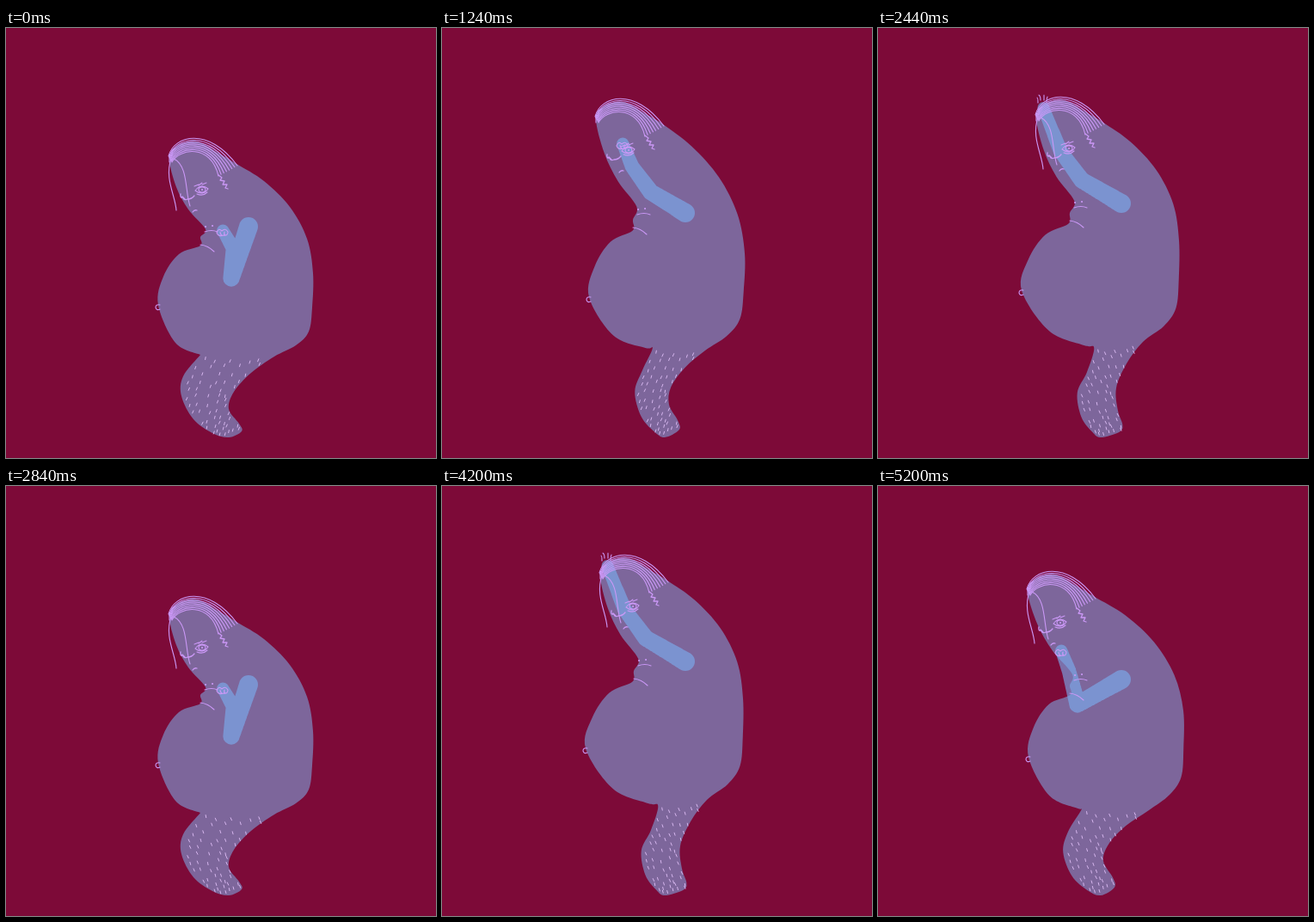
Write an HTML page with a canvas that moves like this. It is 500 px wide and 500 px high and loops after 5.28 s.

```html
<!DOCTYPE html>
<html>
<head>
<meta charset="utf-8">
<style>
html, body { margin: 0; height: 100%; overflow: hidden; background: #7d0a38; }
canvas { display: block; }
</style>
</head>
<body>
<canvas id="stage" width="500" height="500"></canvas>
<script>
const ctx = document.getElementById('stage').getContext('2d');
const BODY = 'rgb(125,102,155)', ARM = 'rgba(123,174,240,.62)';
const LINE = '#cb98f6', FUZZ = '#d6b6ee';

// Crouching outline, clockwise from the crown. A repeated point makes a corner.
const outline = [
  [190,152], [199,137], [222,132], [248,146], [268,158], [300,178], [330,208], [350,245], [357,285],
  [356,325], [352,353], [337,369], [312,382], [285,401], [265,423], [259,443], [271,460], [274,469],
  [259,476], [240,471], [218,455], [204,428], [206,405], [226,380], [226,380], [197,366], [177,322],
  [183,289], [201,263], [226,253], [226,243], [232,234], [212,211], [198,185]];

// Outline points that follow a joint; the points between blend their neighbours.
const handles = [[0, 'head'], [4, 'head'], [8, 'back'], [12, 'hip'], [15, 'shin'], [18, 'foot'],
  [22, 'knee'], [26, 'belly'], [30, 'neck'], [34, 'head']];

// Joints move relative to the crouch; arms run from shoulder to hand.
const zero = [0, 0];
const low = {
  head: zero, back: zero, hip: zero, shin: zero, foot: zero, knee: zero, belly: zero, neck: zero,
  arm: [282,231, 262,291, 264,256, 252,235]
};
const squat = { ...low, head: [-8,1], back: [1,0], hip: [-8,9], shin: [-8,-5], knee: [-2,2],
  belly: [6,6], neck: [-3,6], arm: [280,243, 265,299, 264,266, 251,245] };
const rise = { ...low, head: [-11,-46], back: [-5,-23], hip: [-6,-7], shin: [5,-5], knee: [27,-7],
  belly: [-6,-9], neck: [-4,-20], arm: [283,215, 243,191, 221,161, 210,134] };
const reach = { ...low, head: [-6,-48], back: [-7,-38], hip: [-4,-17], shin: [20,2], knee: [37,-5],
  belly: [-10,-17], neck: [-3,-28], arm: [283,204, 237,177, 212,143, 192,92] };
const sink = { ...low, head: [-16,-29], back: [-2,-24], hip: [3,-5], shin: [3,-7], knee: [15,-3],
  belly: [-2,-7], neck: [-3,-11], arm: [283,225, 232,254, 222,215, 213,191] };

const lerp = (a, b, k) => a + (b - a) * k;
const lerpAll = (a, b, k) => a.map((v, i) => lerp(v, b[i], k));
const mix = (a, b, k) => Object.fromEntries(Object.keys(a).map(key => [key, lerpAll(a[key], b[key], k)]));
const noise = n => { const s = Math.sin(n * 127.1) * 43758.5453; return s - Math.floor(s); };

const peak = { ...mix(sink, reach, 1.45), arm: [281,194, 233,152, 208,108, 188,55] };
const cycle = [low, squat, low, mix(low, rise, .5), rise, mix(rise, peak, .5),
  peak, reach, mix(reach, sink, .5), sink];

const bend = pose => outline.map(([x, y], i) => {
  const h = handles.findIndex(([end]) => end > i);
  const [[from, a], [to, b]] = [handles[h - 1], handles[h]];
  const [dx, dy] = lerpAll(pose[a], pose[b], (i - from) / (to - from));
  return [x + dx, y + dy];
});

function lines(d, [x, y], width = 1.1) {
  ctx.save();
  ctx.translate(x, y);
  ctx.lineWidth = width;
  ctx.stroke(new Path2D(d));
  ctx.restore();
}

function drawBody(points) {
  const n = points.length, at = i => points[(i + n) % n];
  ctx.fillStyle = BODY;
  ctx.beginPath();
  ctx.moveTo(...at(0));
  for (let i = 0; i < n; i++) {
    const [a, b, c, d] = [at(i - 1), at(i), at(i + 1), at(i + 2)];
    ctx.bezierCurveTo(b[0] + (c[0] - a[0]) / 6, b[1] + (c[1] - a[1]) / 6,
      c[0] - (d[0] - b[0]) / 6, c[1] - (d[1] - b[1]) / 6, ...c);
  }
  ctx.fill();
}

function drawArm(arm) {
  ctx.fillStyle = ARM;
  ctx.beginPath();
  for (let v = 0; v < 3; v += .02) {
    const i = Math.floor(v) * 2, r = lerp(11, 7, v / 3);
    const [x, y] = lerpAll(arm.slice(i, i + 2), arm.slice(i + 2, i + 4), v % 1);
    ctx.moveTo(x + r, y);
    ctx.arc(x, y, r, 0, 7);
  }
  ctx.fill();
}

// Short ticks spread between the front and back edge of the leg.
function drawFuzz(points, tilt) {
  const front = points.slice(18, 24).reverse(), back = points.slice(12, 18);
  const along = (edge, v) => lerpAll(edge[Math.floor(v)], edge[Math.floor(v) + 1], v % 1);
  ctx.strokeStyle = FUZZ;
  ctx.lineWidth = 1;
  ctx.beginPath();
  for (let id = 0; id < 60; id++) {
    const v = Math.floor(id / 5) * .38 + noise(id + 1) * .3;
    const u = (id % 5 + .15 + noise(id + 90) * .7) / 5;
    const [x, y] = lerpAll(along(front, v), along(back, v), u);
    ctx.moveTo(x, y);
    ctx.lineTo(x + tilt * (.5 + noise(id + 40)), y + 3);
  }
  ctx.stroke();
}

function drawHair(at, strands) {
  for (let k = 0; k <= 1; k += 1 / 7) {
    lines(`M${189 + 4 * k} ${149 + 7 * k}C${195 + 6 * k} ${125 + 15 * k} ${235 + 3 * k} ${114 + 20 * k}
      ${269 - 22 * k} ${160 + 12 * k}`, at);
  }
  lines('M190 156l0 -9 3 2 0 -6 4 -3', at);
  lines('M247 171l4 3 -2 3 5 1 -2 4 5 0 -2 4 3 1', at, 1.3);
  if (strands) lines('M192 152C184 175 197 195 198 212M195 152C212 160 208 190 214 207', at);
}

function drawFace(at) {
  lines('M220 189q7 -9 15 -2q-6 9 -15 2M222 193q7 3 12 -2M224 188a4 3 0 1 0 8 0a4 3 0 1 0 -8 0', at);
  lines('M228 188h.1', at, 2);
  lines('M219 184l5 -2M224 183l4 -3M228 182l5 -2', at);
  lines('M203 193q-1 5 3 4q1 4 5 2q5 0 8 -4M205 196l3 3M217 214q2 -3 5 -2', at, 1.3);
}

function drawHand(at, raised) {
  lines(raised
    ? 'M-6 -5q0 -6 -1 -6M-3 -8q0 -5 -2 -6M1 -8q0 -4 0 -6M4 -6q0 -4 1 -6'
    : 'M-7 3q2 -6 6 -2q4 -4 7 1q0 5 -5 4q-6 2 -8 -3M-3 2q0 3 2 4M2 2q-1 3 1 4', at);
}

function draw(ms) {
  // Two rounds of ten drawings; the first one rests longer at the bottom.
  const u = ms % 1760, phase = u < 920 ? u : u - 840;
  const step = Math.max(0, Math.floor((phase < 640 ? phase : phase - 40) / 80) - 1);
  const pose = cycle[step], points = bend(pose);

  ctx.fillStyle = '#7d0a38';
  ctx.fillRect(0, 0, 500, 500);
  ctx.lineCap = ctx.lineJoin = 'round';
  drawBody(points);
  drawArm(pose.arm);
  drawFuzz(points, step % 4 ? 1 : -1);

  ctx.strokeStyle = LINE;
  drawHair(pose.head, step !== 4 && step !== 5);
  drawFace(pose.head);
  lines('M232 231h.1M240 230h.1', pose.neck, 2);
  lines('M231 237q8 -3 15 0M226 252q9 1 16 8', pose.neck);
  lines('M179 322q-5 -1 -5 3q1 4 5 2', pose.belly);
  drawHand(pose.arm.slice(6), step > 4 && step < 8);
}

const start = performance.now();
function tick() {
  draw((performance.now() - start) % 5280);
  requestAnimationFrame(tick);
}
tick();
</script>
</body>
</html>
```
